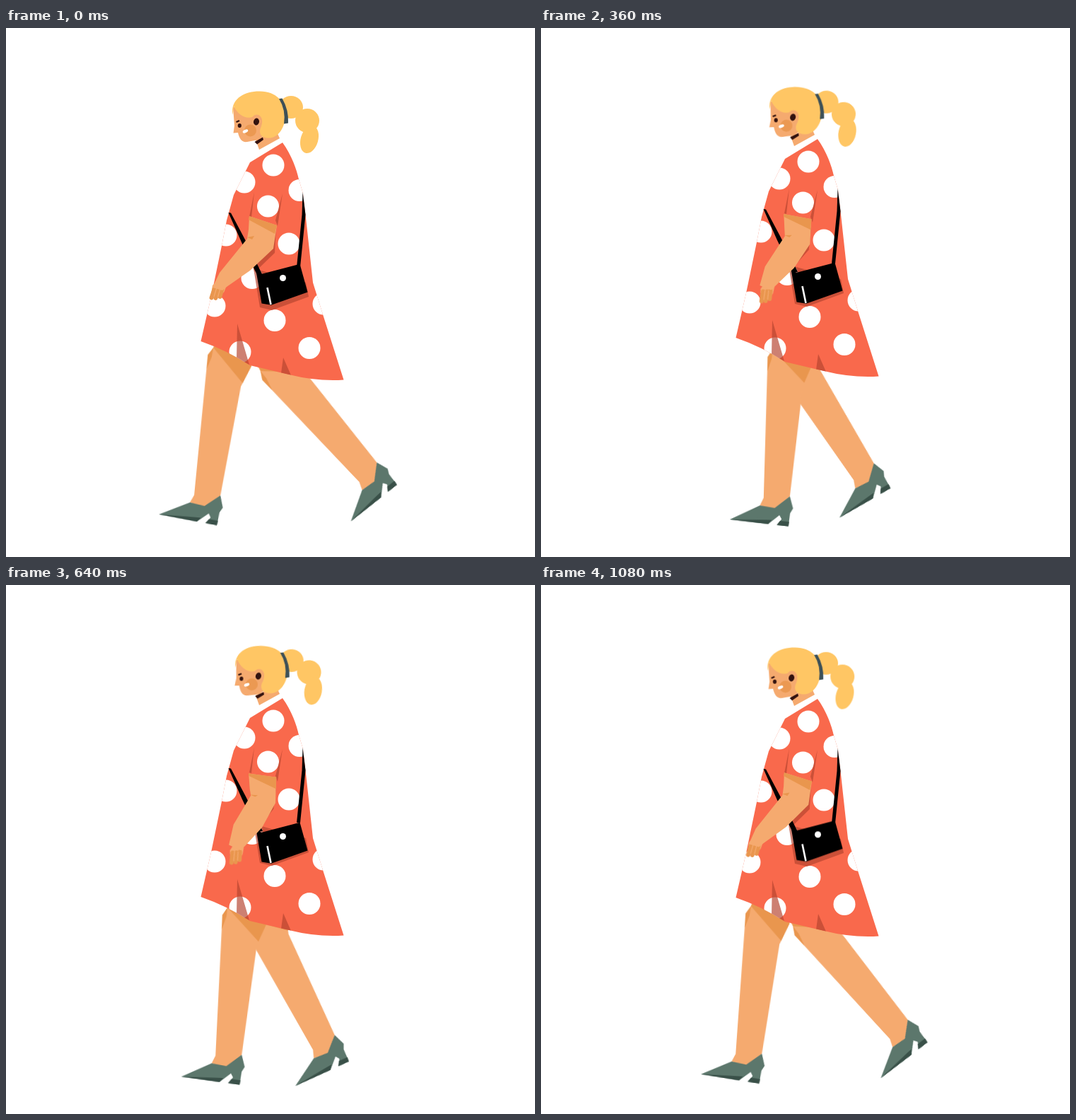
Recreate the animation shown at these times as an HTML page without scripts. Size 748 by 748 pixels, loop 1120 ms.

```html
<!DOCTYPE html>
<html lang="en">
<head>
<meta charset="utf-8">
<title>Walk cycle</title>
<style>
  html, body { margin: 0; width: 100%; height: 100%; overflow: hidden; background: #fff; }
  svg { display: block; width: 100vw; height: 100vh; }

  .skin { fill: #f5aa6f; }
  .shade { fill: #e9964e; }
  .hair { fill: #ffc664; }
  .red { fill: #f9694c; }
  .fold { fill: #b54430; fill-opacity: .68; }
  .shoe { fill: #5c776c; }
  .sole { fill: #395048; }
  .ink { fill: #32120f; }

  /* Seven 40 ms steps per quarter, fourteen per half */
  .leg-far, .leg-near { animation: far 1.12s steps(7) -4ms infinite; }
  .leg-near { animation-name: near; }
  .body { animation: bob .56s steps(7) -4ms infinite; }
  .head, .pony, .tie, .bag, .hand, .arm, .cuff, .cast {
    animation: 1.12s steps(14) -4ms infinite;
  }
  .head { animation-name: nod; transform-origin: 378px 165px; }
  .pony { animation-name: swing; transform-origin: 394px 117px; }
  .tie { animation-name: lift; }
  .bag { animation-name: sag; }
  .hand { animation-name: hand; transform-origin: 302px 362px; }
  .arm { animation-name: arm; }
  .cuff { animation-name: cuff; }
  .cast { animation-name: cast; }

  @keyframes far {
    0%, 100% { transform: translate(344.8px, 416.8px) rotate(5.5deg); }
    25% { transform: translate(338.5px, 400.5px) rotate(-33.3deg); }
    50% { transform: translate(355.5px, 409.2px) rotate(-39.6deg); }
    75% { transform: translate(364px, 422px) rotate(-5deg); }
  }
  @keyframes near {
    0%, 100% { transform: translate(367px, 423px) rotate(-43.6deg); }
    25% { transform: translate(380px, 413px) rotate(-5.2deg); }
    50% { transform: translate(368.3px, 423px) rotate(18.5deg); }
    75% { transform: translate(350px, 407px) rotate(-36.7deg); }
  }
  @keyframes bob { 50% { transform: translateY(-7px); } }
  @keyframes nod { 50% { transform: translate(.5px, 0) rotate(5deg); } }
  @keyframes swing { 50% { transform: translate(1.5px, -2.5px) rotate(-7deg); } }
  @keyframes lift { 50% { transform: translate(2px, -2.5px); } }
  @keyframes sag { 50% { transform: translateY(4.6px); } }
  @keyframes hand { 50% { transform: translate(28px, 13px) rotate(-14deg); } }
  @keyframes arm {
    0%, 100% { d: path("M344 266L383 279L378 312L345 343L312 366L306 371L292 367L302 346L341 298L343 285Z"); }
    50% { d: path("M343 269L382 273L381.5 310L365 345L342 372L336 378L319 370L325 340L347 300L345 291Z"); }
  }
  @keyframes cuff {
    0%, 100% { d: path("M344 266L383 279L380 291L343 271ZM341 296L351 294L348 299Z"); }
    50% { d: path("M343 269L382 273L382 290L343 272ZM346 299L357 300L353 302Z"); }
  }
  @keyframes cast {
    0%, 100% { d: path("M382 280L380 318L352 345L345 330Z"); }
    50% { d: path("M382 290L378 319L366 335L350 325Z"); }
  }
</style>
</head>
<body>
<svg viewBox="0 0 748 748">
  <defs>
    <!-- Hip joint at 0,0 -->
    <g id="leg">
      <path class="skin" d="M-40 5L-48 40L-54.7 50.7L-55 250L-60 261L-39 266L-18 247L-4 91L8 61L20 5Z"/>
      <path class="shade" d="M-48 40L-2 86L8 61L0 30L-40 25ZM-48 40L-54.7 50.7L-54.5 71L-49 53Z"/>
      <path class="shoe" d="M-102 282L-60 261L-39 264L-18 247L-13 264L-17 271L-19 289.4L-35.4 288L-28.8 279.5L-32 274L-47.6 287Z"/>
      <path class="sole" d="M-102 282L-42.5 281L-47.6 287ZM-31 282L-18 283L-19 289.4L-35.4 288Z"/>
    </g>
    <path id="dress" d="M345 190L391 162C404 180 411 200 414 214L420 234L423.5 264L434 360L448 405L477.5 497.5Q440 500 400 490L345 477Q313 456 275.5 443L290 380L305 308L312 272L322 236Z"/>
    <clipPath id="cut"><use href="#dress"/></clipPath>
    <circle id="dot" r="15.5" fill="#fff"/>
  </defs>

  <use href="#leg" class="leg-far"/>
  <use href="#leg" class="leg-near"/>

  <g class="body">
    <g class="pony hair">
      <ellipse cx="403" cy="112" rx="17" ry="16"/>
      <circle cx="426" cy="131" r="17"/>
      <ellipse cx="429" cy="157.5" rx="12.3" ry="20" transform="rotate(16 429 157.5)"/>
    </g>

    <use href="#dress" class="red"/>
    <g clip-path="url(#cut)">
      <use href="#dot" x="378" y="194"/>
      <use href="#dot" x="337" y="218"/>
      <use href="#dot" x="415" y="229.5"/>
      <use href="#dot" x="370.5" y="252"/>
      <use href="#dot" x="311" y="293"/>
      <use href="#dot" x="400" y="305"/>
      <use href="#dot" x="348" y="353.5"/>
      <use href="#dot" x="449" y="390"/>
      <use href="#dot" x="295" y="393"/>
      <use href="#dot" x="380" y="413.5"/>
      <use href="#dot" x="429" y="452.5"/>
      <use href="#dot" x="331" y="458"/>
      <path class="fold" d="M351 232L344 267L347 268ZM391 234L381 272L384 280ZM327 418L344 476L326 468ZM392 466L403 491L389 488Z"/>
      <path class="fold" d="M350 340L359 395L376 399L428 380L424 360Z"/>
    </g>
    <path class="cast fold" d="M382 280L380 318L352 345L345 330Z"/>

    <path d="M314.5 261L318 261.5L339.5 302L363 350L356 351L333.5 304ZM419.5 232L423.5 264L416 338L411 338L418.5 264Z"/>
    <g class="bag">
      <path d="M353.5 343L361 348L415.5 333.8L426.5 373.5L375 391.7L361.5 389.5Z"/>
      <path d="M369.5 367L374.5 391" stroke="#fff" stroke-width="2.6"/>
      <circle cx="391.5" cy="353.5" r="4.5" fill="#fff"/>
    </g>

    <g class="hand">
      <path class="skin" d="M292 364L302 354L312 364L308.5 373L304 378L290 376Z"/>
      <path d="M295 368L290.5 381.5M300.5 369L296.5 382M305.5 369L302.5 380" fill="none" stroke="#e9964e" stroke-width="5.8" stroke-linecap="round"/>
      <path d="M298 367L294 380M303 368L299.5 380.5" fill="none" stroke="#f5aa6f" stroke-width="1.2"/>
    </g>
    <path class="arm skin" d="M344 266L383 279L378 312L345 343L312 366L306 371L292 367L302 346L341 298L343 285Z"/>
    <path class="cuff shade" d="M344 266L383 279L380 291L343 271ZM341 296L351 294L348 299Z"/>

    <path class="skin" d="M353 158L358 172L387 156L382 145Z"/>
    <g class="head">
      <path class="skin" d="M321 112L323 138L321.5 148.5L328 148C330 157 334 162 341 161L357 158L367 150L366 112Z"/>
      <path class="ink" d="M351.5 161L363 154.5L364 158L355 164.5Z"/>
      <circle class="shade" cx="345.5" cy="145" r="8.5" opacity=".85"/>
      <path class="hair" d="M320.5 123C317 101 336 89.5 358 89.5C381 89 395 104 395 122C395 142 384 157 369 155.5C359 154 357 147 361 139C364 130 361 124 354 123C344 131 330 126 322 111Z"/>
      <ellipse class="skin" cx="354.5" cy="131" rx="7.5" ry="8.5"/>
      <ellipse class="ink" cx="354" cy="132.5" rx="4" ry="5" transform="rotate(12 354 132.5)"/>
      <ellipse class="ink" cx="330.3" cy="138" rx="2.6" ry="3"/>
      <path d="M325.5 133L330 131" stroke="#32120f" stroke-width="2.4"/>
      <ellipse cx="338.5" cy="146" rx="4" ry="2.2" fill="#fff" transform="rotate(-25 338.5 146)"/>
    </g>
    <path class="tie" fill="#3d5057" d="M386 100L390.5 99.5Q400 116 399 134.5L393 135.5Q396 116 386 100Z"/>
  </g>
</svg>
</body>
</html>
```
